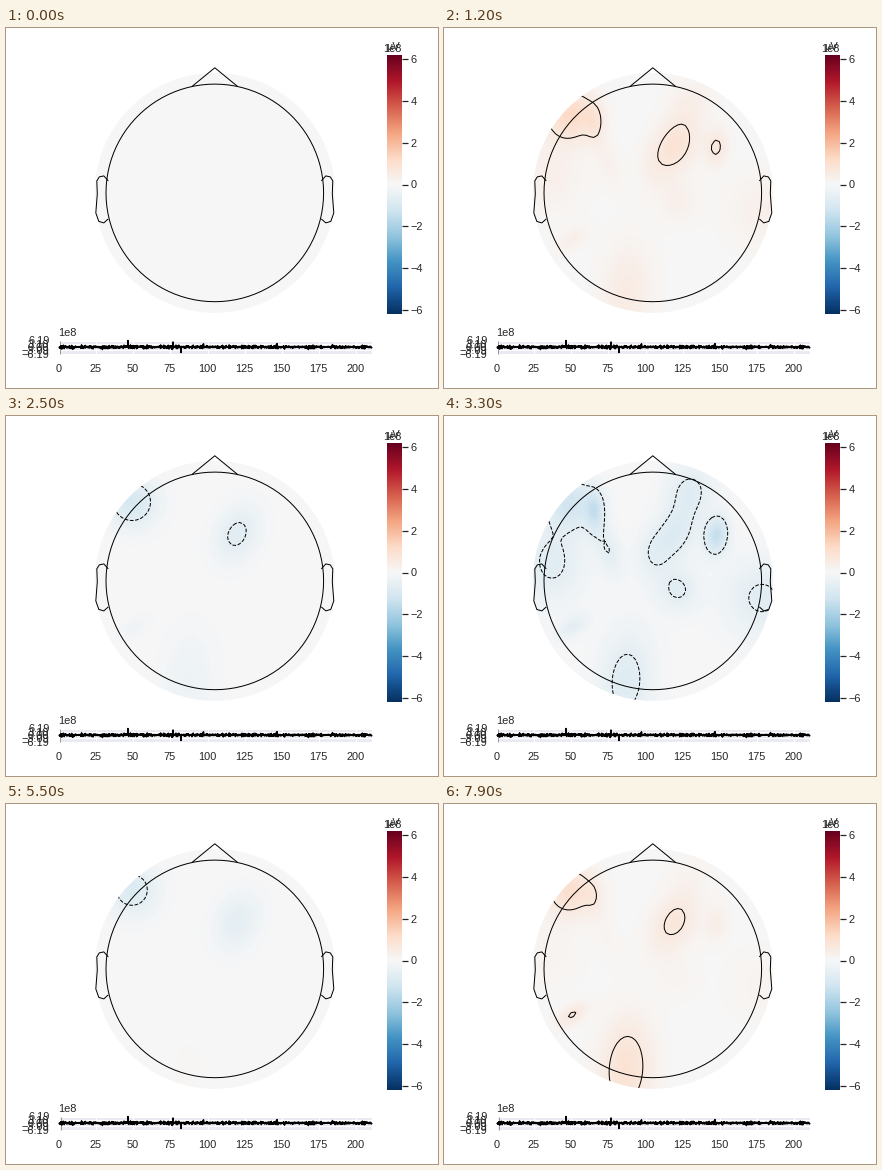
A matplotlib script that plays this animation: 432x360 px, repeating every 8 s.

```python
import matplotlib.pyplot as plt
import numpy as np
from matplotlib.animation import FuncAnimation
from matplotlib.patches import Circle, Rectangle

W, H, DPI = 432, 360, 72
FRAMES, STEP = 80, 100
VMAX = 6.19
CONTOUR = 0.6
LEVELS = CONTOUR * np.arange(-9, 10, 2)
CX, CY, HEAD, DISC = 208.8, 164.9, 108.8, 120
INK = "#262626"

plt.rcParams.update({"font.family": "Liberation Sans", "font.size": 11,
                     "text.color": INK})
fig = plt.figure(figsize=(W / DPI, H / DPI), dpi=DPI, facecolor="white")
ax = fig.add_axes([0, 0, 1, 1])
ax.axis("off")

side = np.linspace(-DISC, DISC, 64)
X, Y = np.meshgrid(CX + side, CY + side)


def field(*sites):
    """Sum of Gaussians (x, y, sx, sy, peak in contour levels, lean)."""
    total = np.zeros_like(X)
    for x, y, sx, sy, peak, lean in sites:
        a = np.radians(lean)
        dx, dy = X - x, Y - y
        u = (dx * np.cos(a) + dy * np.sin(a)) / sx
        v = (dy * np.cos(a) - dx * np.sin(a)) / sy
        total += CONTOUR * peak * np.exp(-(u * u + v * v) / 2)
    return total


# Three groups of sites, each moving with one shared wave
front = field((126, 86, 18, 18, 2.0, 0), (231, 118, 15, 21, 1.39, 25))
burst = field(
    (151, 95, 6.5, 14, 3.1, 0), (164, 134, 9, 20, 1.65, -17),
    (246, 74, 17, 19, 2.0, 15), (272.5, 119.5, 8, 13.5, 4.2, 8),
    (234, 174, 15, 16, 1.9, 0), (207, 140, 12, 19, 1.25, 0),
    (108, 146, 23, 30, 2.0, 0), (318, 182, 27, 28, 1.95, 0))
back = field((182, 265, 19, 37, 2.05, 4), (128, 211, 6.5, 13, 1.45, 56))

TIMES = [0, 1200, 2000, 2500, 3250, 4000, 5500, 6400, 7600, 7900]
WAVES = [
    (front, [0, 1, -.6, -.85, -.95, -1.07, -.72, -.48, .48, .84]),
    (burst, [0, .26, 1, 0, -.6, -.29, 0, 0, .05, .15]),
    (back, [0, .4, 1, -.25, -.65, -.42, .05, 0, .45, .72]),
]


def scalp_at(t):
    return sum(np.interp(t, TIMES, wave) * group for group, wave in WAVES)


def line(x, y, lw=1.0, color="black", z=5):
    return ax.plot(x, y, color=color, lw=lw, zorder=z,
                   solid_capstyle="butt")[0]


def draw_head():
    a = np.linspace(0, 2 * np.pi, 201)
    line(CX + HEAD * np.cos(a), CY + HEAD * np.sin(a))
    base = .978 * HEAD
    line([CX - .21 * HEAD, CX, CX + .21 * HEAD],
         [CY - base, CY - 1.15 * HEAD, CY - base])
    ear = np.array([(106.5, -12), (111, -17), (115.5, -16), (118, -12),
                    (117.5, 1), (119, 20), (116, 28.5), (111, 30), (106.5, 26)])
    for s in (-1, 1):
        line(CX + s * ear[:, 0], CY + ear[:, 1])


def draw_colorbar():
    left, right, mid, unit = 381, 396, 156.5, 20.85
    ramp = np.linspace(1, -1, 256)[:, None] * VMAX
    ax.imshow(ramp, cmap="RdBu_r", vmin=-VMAX, vmax=VMAX, aspect="auto",
              extent=[left, right, mid + VMAX * unit, mid - VMAX * unit])
    for v in range(-6, 7, 2):
        y = mid - v * unit
        line([right, right + 6], [y, y], 1.25, INK)
        ax.text(right + 8.5, y, str(v).replace("-", "\u2212"),
                va="center_baseline")
    ax.text(387.5, 21.5, "\u00b5V", ha="center", va="baseline")
    ax.text(386.5, 24, "1e8", ha="center", va="baseline")


def draw_trace():
    left, right, top, bottom, unit = 53, 366, 312.5, 325.5, 1.486
    mid = (top + bottom) / 2
    ax.add_patch(Rectangle((left, top), right - left, bottom - top,
                           fc="#eaeaf2", ec="none", zorder=1))
    for v in range(0, 201, 25):
        x = left + v * unit
        line([x, x], [top, bottom], 1, "white", 2)
        ax.text(x - .5, 344, str(v), ha="center", va="baseline")
    for v in np.linspace(VMAX, -VMAX, 5):
        y = mid - v / VMAX * (bottom - top) / 2
        line([left, right], [y, y], 1, "white", 2)
        ax.text(43.5, y, f"{v:.2f}".replace("-", "\u2212"),
                ha="right", va="center_baseline")
    ax.text(left - .5, 308, "1e8", va="baseline")

    rng = np.random.default_rng(4)
    n = 1500
    x = np.linspace(left, right, n)
    envelope = np.repeat(rng.uniform(.3, 1, 60), n // 60)
    y = mid + rng.normal(0, 1, n) * envelope
    for at, spike in ((122, top), (167, top + 1.5), (175, bottom - 1)):
        y[np.argmin(abs(x - at))] = spike
    line(x, y, 1.5, "black", 4)
    return line([left, left], [top, bottom], 1, "#999999", 3)


draw_head()
draw_colorbar()
cursor = draw_trace()

disc = Circle((CX, CY), DISC, transform=ax.transData)
half = DISC * 64 / 63
scalp = ax.imshow(np.zeros_like(X), cmap="RdBu_r", vmin=-VMAX, vmax=VMAX,
                  interpolation="bilinear", zorder=1,
                  extent=[CX - half, CX + half, CY + half, CY - half])
scalp.set_clip_path(disc)
ax.set(xlim=(0, W), ylim=(H, 0), aspect="auto")

rings = []


def update(i):
    t = i * STEP
    values = scalp_at(t)
    scalp.set_data(values)
    while rings:
        rings.pop().remove()
    levels = [v for v in LEVELS if values.min() < v < values.max()]
    if levels:
        ring = ax.contour(X, Y, values, levels, colors="black",
                          linewidths=1, zorder=4)
        ring.set_clip_path(disc)
        rings.append(ring)
    x = 53.5 if t < 5000 else 54.5
    cursor.set_xdata([x, x])
    return [scalp, cursor, *rings]


anim = FuncAnimation(fig, update, frames=FRAMES, interval=STEP,
                     repeat=True, repeat_delay=0, blit=False)
plt.show()
```
